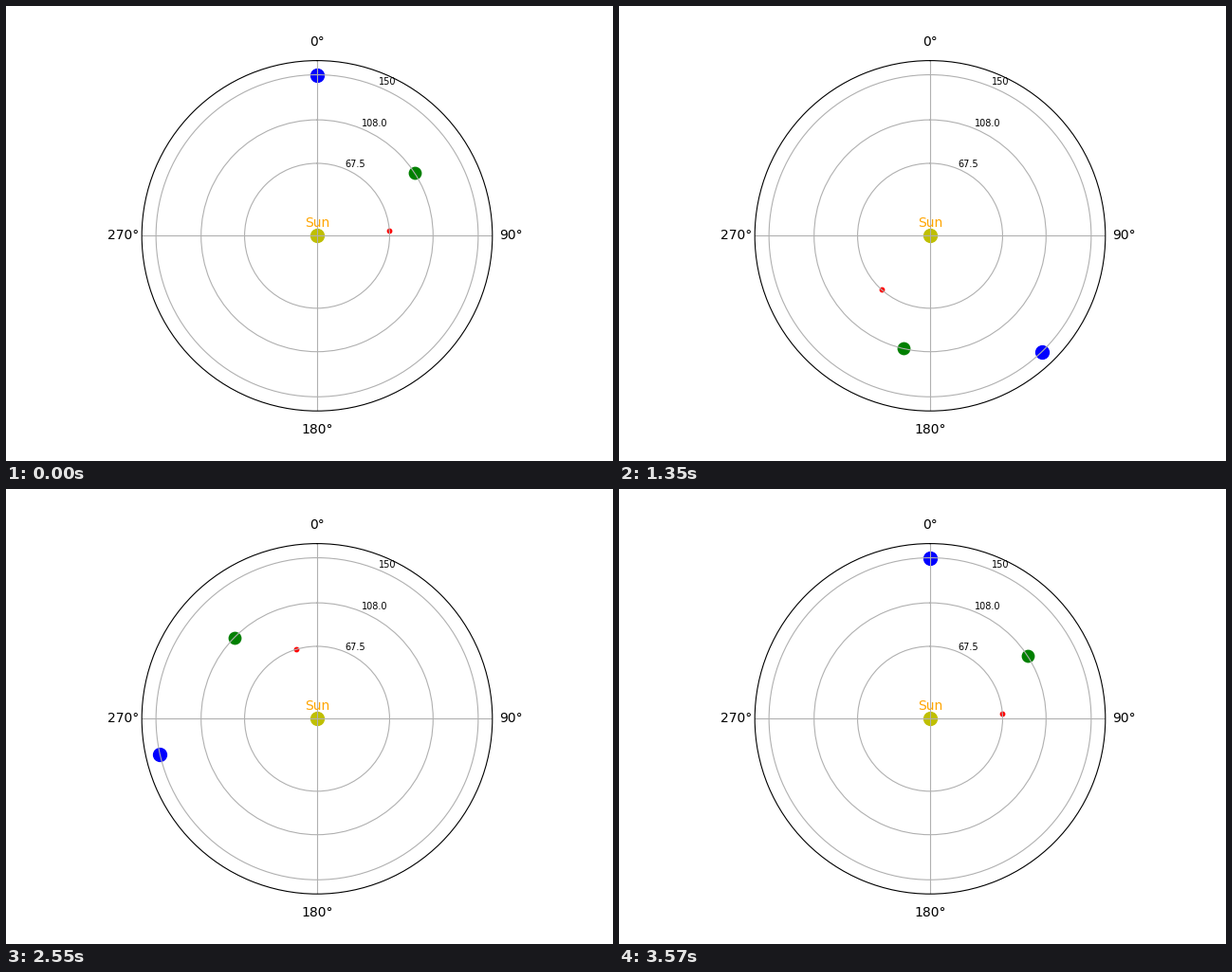
Recreate the animation shown at these times as a matplotlib script. Size 640 by 480 pixels, loop 3.6 s.

```python
import numpy as np
import matplotlib.pyplot as plt
from matplotlib.animation import FuncAnimation

FRAMES = 120
angles = np.linspace(0, 2 * np.pi, FRAMES)

# (start angle in radians, orbit radius, colour, marker area)
PLANETS = [
    (1.5, 67.5, "r", 10),
    (1.0, 108.0, "g", 80),
    (0.0, 150.0, "b", 100),
]

fig = plt.figure(figsize=(6.4, 4.8), dpi=100)
ax = fig.add_subplot(projection="polar")
ax.set_theta_zero_location("N")
ax.set_theta_direction(-1)
ax.set_thetagrids([0, 90, 180, 270])
ax.set_yticks([67.5, 108.0, 150.0], labels=["67.5", "108.0", "150"])
ax.tick_params(axis="y", labelsize=7)

ax.scatter(0, 0, s=100, c="y")
ax.text(0, 8, "Sun", color="orange", ha="center", va="baseline")
dots = [ax.scatter(start, radius, s=size, c=color)
        for start, radius, color, size in PLANETS]
ax.set_ylim(0, 163.2)


def update(frame):
    for dot, (start, radius, _, _) in zip(dots, PLANETS):
        dot.set_offsets([[start + angles[frame], radius]])
    return dots


anim = FuncAnimation(fig, update, frames=FRAMES, interval=30,
                     repeat=True, repeat_delay=0)
plt.show()
```
